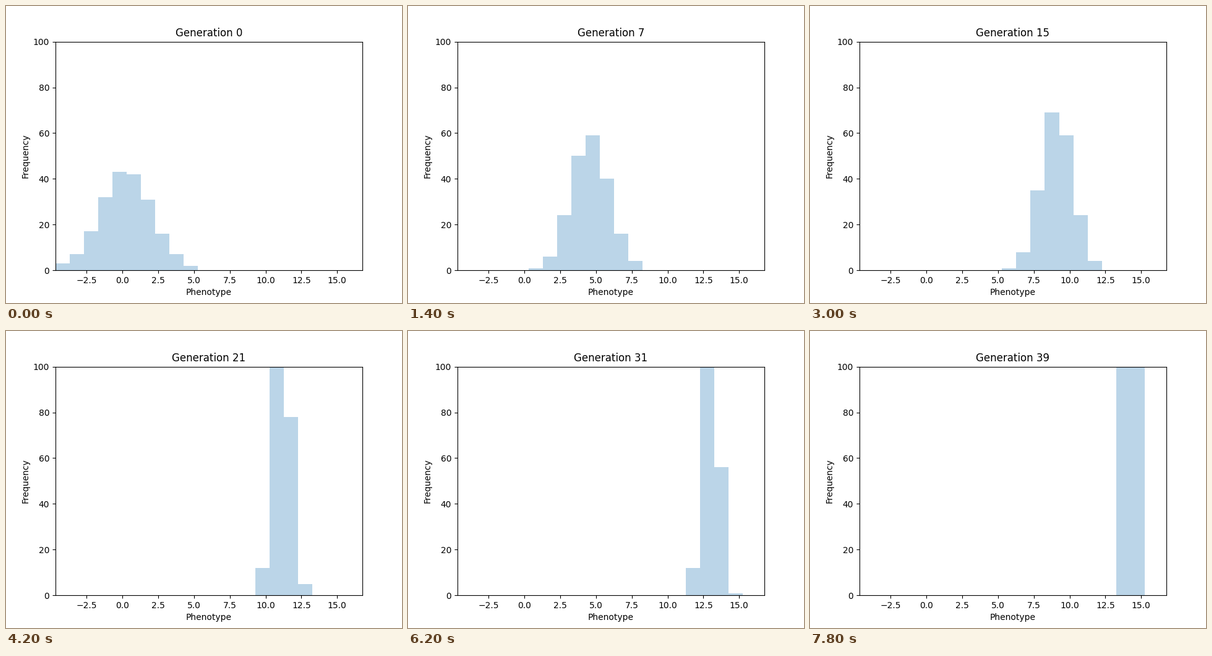
A matplotlib script for the animation above (8000 ms loop, 640 by 480 pixels).

```python
from math import erf, sqrt

import numpy as np
import matplotlib.pyplot as plt
from matplotlib.animation import FuncAnimation

GENERATIONS = 40
STEP_MS = 200
POPULATION = 200
BINS = 21
X_MIN, X_MAX = -4.679, 16.760
BIN_WIDTH = 0.99576

# Key points of the drifting, narrowing bell curve, in bin units
KEY_GENS = [0, 7, 15, 21, 27, 35, 39]
MEANS = [4.95, 9.32, 13.83, 15.88, 17.11, 18.354, 19.0]
SPREADS = [1.78, 1.30, 1.08, 0.57, 0.49, 0.449, 0.32]


def histogram(gen):
    """Individuals per bin for a normally distributed population."""
    mean = np.interp(gen, KEY_GENS, MEANS)
    spread = np.interp(gen, KEY_GENS, SPREADS)
    below = [POPULATION * (1 + erf((edge - mean) / spread / sqrt(2))) / 2
             for edge in range(1, BINS + 1)]
    return np.diff(np.rint(below), prepend=0)


fig, ax = plt.subplots(figsize=(6.4, 4.8), dpi=100)
lefts = X_MIN + BIN_WIDTH * np.arange(BINS)
bars = ax.bar(lefts, histogram(0), width=BIN_WIDTH, align="edge",
              color="C0", alpha=0.3)
ax.set_xlim(X_MIN, X_MAX)
ax.set_ylim(0, 100)
ax.set_xlabel("Phenotype")
ax.set_ylabel("Frequency")
title = ax.set_title("Generation 0")


def update(gen):
    for bar, count in zip(bars, histogram(gen)):
        bar.set_height(count)
    title.set_text(f"Generation {gen}")
    return [*bars, title]


anim = FuncAnimation(fig, update, frames=GENERATIONS, interval=STEP_MS,
                     repeat=True, repeat_delay=0, blit=False)
plt.show()
```
